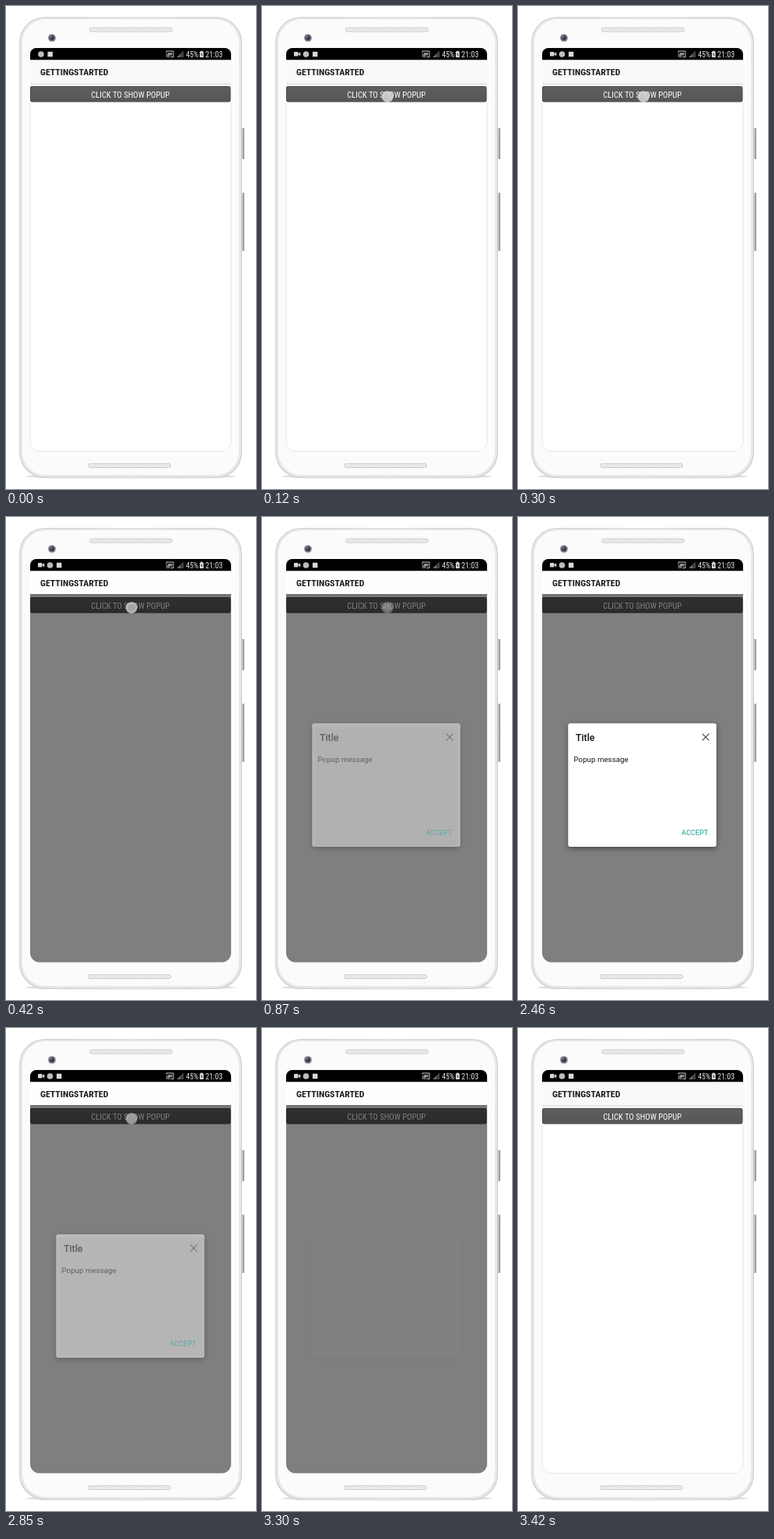
Animation, 321 px wide and 621 px high, one loop 3450 ms. Source, as an HTML page with a canvas:

```html
<!DOCTYPE html>
<html lang="en">
<head>
<meta charset="utf-8">
<title>Popup demo</title>
<style>
html, body { margin: 0; width: 100%; height: 100%; overflow: hidden; background: #fff; }
canvas { display: block; width: 321px; height: 621px; }
</style>
</head>
<body>
<canvas id="stage"></canvas>
<script>
const W = 321, H = 621, LOOP = 3450;
const canvas = document.getElementById('stage');
const ctx = canvas.getContext('2d');
const dpr = window.devicePixelRatio || 1;
canvas.width = W * dpr;
canvas.height = H * dpr;

const NARROW = '"Roboto Condensed", Roboto, sans-serif';
const NORMAL = 'Roboto, sans-serif';

const ramp = (t, a, b) => Math.min(1, Math.max(0, (t - a) / (b - a)));

function roundPath(x, y, w, h, r) {
  ctx.beginPath();
  ctx.roundRect(x, y, w, h, r);
}

function box(x, y, w, h, r, fill, stroke, width = 1) {
  roundPath(x, y, w, h, r);
  if (fill) { ctx.fillStyle = fill; ctx.fill(); }
  if (stroke) { ctx.strokeStyle = stroke; ctx.lineWidth = width; ctx.stroke(); }
}

function disc(x, y, r, fill) {
  ctx.beginPath();
  ctx.arc(x, y, r, 0, Math.PI * 2);
  ctx.fillStyle = fill;
  ctx.fill();
}

function line(points, color, width) {
  ctx.beginPath();
  points.forEach(([x, y], i) => i ? ctx.lineTo(x, y) : ctx.moveTo(x, y));
  ctx.strokeStyle = color;
  ctx.lineWidth = width;
  ctx.stroke();
}

function shade(x0, y0, x1, y1, ...colors) {
  const g = ctx.createLinearGradient(x0, y0, x1, y1);
  colors.forEach((c, i) => g.addColorStop(i / (colors.length - 1), c));
  return g;
}

function text(str, x, y, size, color, weight = 400, family = NORMAL, align = 'left') {
  ctx.font = `${weight} ${size}px ${family}`;
  ctx.fontStretch = family === NARROW ? 'condensed' : 'normal';
  ctx.letterSpacing = family === NARROW && !hasNarrow ? `${-0.075 * size}px` : '0px';
  ctx.textAlign = align;
  ctx.fillStyle = color;
  ctx.fillText(str, x, y);
}

// Tighten the tracking when no condensed face is available.
const hasNarrow = (() => {
  const measure = (family, stretch) => {
    ctx.font = `400 40px ${family}`;
    ctx.fontStretch = stretch;
    return ctx.measureText('SHOW POPUP').width;
  };
  return measure(NARROW, 'condensed') < measure(NORMAL, 'normal') * 0.95;
})();

function speaker(x, y) {
  box(x + 0.5, y + 0.5, 106, 5, 2.5, '#ececec', '#cbcbcb');
  for (let i = 0; i < 25; i++) disc(x + 5.5 + i * 4, y + 3, 0.8, '#d6d6d6');
}

function drawPhone() {
  ctx.fillStyle = shade(0, 603, 0, 609, 'rgba(0,0,0,.2)', 'rgba(0,0,0,0)');
  ctx.beginPath();
  ctx.ellipse(160, 605, 136, 3, 0, 0, Math.PI * 2);
  ctx.fill();

  box(302, 157, 4, 40, 1, shade(302, 0, 306, 0, '#dcdcdc', '#8f8f8f'));
  box(302, 240, 4, 75, 1, shade(302, 0, 306, 0, '#dcdcdc', '#8f8f8f'));

  box(17, 14, 286, 593, 33, shade(17, 0, 303, 0, '#cfcfcf', '#dedede', '#cfcfcf'));
  box(18.2, 15.2, 283.6, 590.2, 32, '#e8e8e8');
  box(21, 17, 278, 586, 30, '#fbfbfb');

  speaker(107, 27.5);
  speaker(105, 588);

  disc(59, 41, 5.6, '#d9d9dc');
  disc(59, 41, 4.6, '#73727e');
  disc(59, 41, 2.8, '#34334a');
  disc(58, 40, 1, '#9a9ab8');
}

function drawStatus(t) {
  ctx.fillStyle = '#000';
  ctx.fillRect(31, 54, 258, 15.5);

  const recording = t >= 60;
  const x = recording ? 56.5 : 45;
  if (recording) {
    box(41, 59, 5.5, 5.5, 0.7, '#d5d5d5');
    ctx.beginPath();
    ctx.moveTo(46, 61.8);
    ctx.lineTo(49.3, 59.2);
    ctx.lineTo(49.3, 64.4);
    ctx.fill();
  }
  disc(x, 62, 3.8, '#bdbdbd');
  box(x + 8.5, 58.8, 6.4, 6.4, 0, '#d8d8d8');

  // Cast
  line([[206, 60], [206, 58], [215, 58], [215, 65.5], [211.5, 65.5]], '#c9c9c9', 1);
  ctx.fillStyle = '#8c8c8c';
  ctx.fillRect(208, 60, 5.5, 3.5);
  for (const r of [1.5, 3, 4.5]) {
    ctx.beginPath();
    ctx.arc(205.5, 66, r, -Math.PI / 2, 0);
    ctx.strokeStyle = '#d0d0d0';
    ctx.lineWidth = 0.8;
    ctx.stroke();
  }

  // Signal
  for (let i = 0; i < 4; i++) {
    ctx.fillStyle = i < 2 ? '#bbb' : '#777';
    ctx.fillRect(220.5 + i * 2, 64 - i * 1.9, 1.1, 2 + i * 1.9);
  }

  text('45%', 231, 65.7, 10, '#e4e4e4', 400, NARROW);

  // Battery
  ctx.fillStyle = '#e4e4e4';
  ctx.fillRect(250, 57.6, 2.4, 1.2);
  box(248.8, 58.6, 4.8, 7.4, 0.6, '#e4e4e4');
  line([[251.7, 59.9], [250.4, 62.3], [252, 62.3], [250.8, 64.8]], '#333', 0.8);

  text('21:03', 256, 65.7, 10, '#e4e4e4', 400, NARROW);
}

function drawScreen(t, dimmed) {
  ctx.save();
  roundPath(31, 54, 258, 518.5, [8, 8, 12, 12]);
  ctx.clip();
  ctx.fillStyle = '#fff';
  ctx.fillRect(31, 54, 258, 519);
  drawStatus(t);

  ctx.fillStyle = dimmed ? '#fefefe' : '#f9f9f9';
  ctx.fillRect(31, 69.5, 258, 30.5);
  ctx.fillStyle = shade(0, 99, 0, 102.5, '#d4d4d4', '#fff');
  ctx.fillRect(31, 99.5, 258, 3);
  text('GETTINGSTARTED', 44, 89.4, 11.8, '#1d1d1d', 700, NARROW);

  box(31.5, 103.5, 256.5, 19.5, 1.5, shade(0, 104, 0, 123, '#5f5f5f', '#565656'), '#4b4b4b');
  text('CLICK TO SHOW POPUP', 159.7, 117.8, 10.6, '#fff', 400, NARROW, 'center');

  if (dimmed) {
    ctx.fillStyle = 'rgba(0,0,0,.5)';
    ctx.fillRect(31, 99, 258, 474);
  }
  ctx.restore();
  if (!dimmed) {
    ctx.save();
    ctx.beginPath();
    ctx.rect(30, 124, 260, 450);
    ctx.clip();
    box(31, 54, 258, 518.5, [8, 8, 12, 12], null, '#e4e4e4', 0.9);
    ctx.restore();
  }
}

function drawPopup(alpha) {
  if (alpha <= 0) return;
  ctx.save();
  ctx.globalAlpha = alpha;
  ctx.shadowColor = 'rgba(0,0,0,.45)';
  ctx.shadowBlur = 7 * dpr;
  ctx.shadowOffsetY = 2 * dpr;
  box(64.3, 265.3, 190.4, 158.6, 3, '#fff');
  ctx.shadowColor = 'transparent';

  text('Title', 74, 288, 12.3, '#111', 500);
  line([[236.7, 278.7], [245.3, 287.3]], '#444', 1.2);
  line([[245.3, 278.7], [236.7, 287.3]], '#444', 1.2);
  text('Popup message', 71.5, 315.2, 9.75, '#151515');
  text('ACCEPT', 210, 408.7, 9.1, '#189c94');
  ctx.restore();
}

function drawTouch(alpha, dimmed) {
  if (alpha <= 0) return;
  ctx.save();
  ctx.globalAlpha = alpha;
  disc(161.2, 116.6, 7.4, dimmed ? 'rgba(205,205,208,.85)' : 'rgba(222,222,222,.82)');
  disc(161.2, 116.6, 4.6, dimmed ? 'rgba(150,150,155,.6)' : 'rgba(190,190,190,.4)');
  ctx.restore();
}

function popupAlpha(t) {
  if (t < 2000) return ramp(t, 450, 1290);
  if (t >= 3420) return 0;
  return Math.max(0.025, 1 - ramp(t, 2460, 3300));
}

function touchAlpha(t) {
  if (t < 2000) return t < 60 ? 0 : t < 120 ? 0.6 : 1 - ramp(t, 780, 960);
  return ramp(t, 2490, 2580) * (1 - ramp(t, 2820, 2970));
}

function draw(t) {
  const dimmed = t >= 420 && t < 3420;
  ctx.setTransform(dpr, 0, 0, dpr, 0, 0);
  ctx.fillStyle = '#fff';
  ctx.fillRect(0, 0, W, H);
  drawPhone();
  drawScreen(t, dimmed);
  drawPopup(popupAlpha(t));
  drawTouch(touchAlpha(t), dimmed);
}

const start = performance.now();
function tick() {
  draw((performance.now() - start) % LOOP);
  requestAnimationFrame(tick);
}
tick();
</script>
</body>
</html>
```
